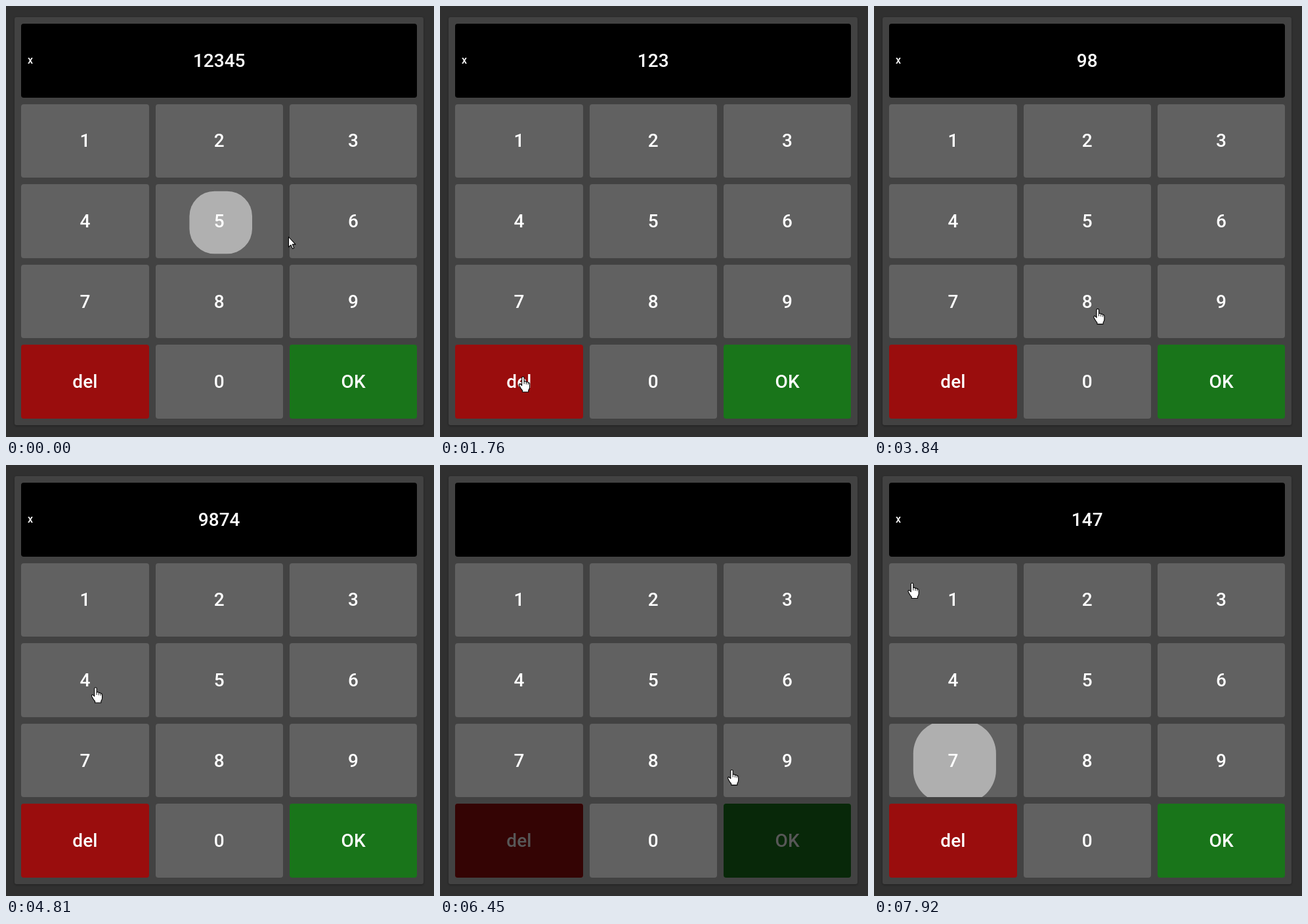
Recreate the animation shown at these times as an HTML page with a canvas. Size 652 by 658 pixels, loop 8000 ms.

```html
<!DOCTYPE html>
<html lang="en">
<head>
<meta charset="utf-8">
<title>Keypad</title>
<style>
html, body { margin: 0; width: 100%; height: 100%; overflow: hidden; background: #303030; }
canvas { display: block; width: 652px; height: 658px; }
</style>
</head>
<body>
<canvas id="stage" width="652" height="658"></canvas>
<script>
const ctx = document.getElementById('stage').getContext('2d');
const LOOP = 8000, STEP = 135, RIPPLE = 700, TRAVEL = 145;
const FONT = 'Roboto, Arial, sans-serif';
const COLORS = { del: '#9a0d0d', OK: '#19751a' };

// The screen refreshes every STEP ms, counted afresh from each of these times
const STARTS = [0, 130, 820, 1370, 2470, 3570, 4660, 5790, 6870, 7920];

const KEYS = ['1', '2', '3', '4', '5', '6', '7', '8', '9', 'del', '0', 'OK'].map((label, i) => {
  const left = 23.2 + (i % 3) * 204.35, top = 27 + (1 + Math.floor(i / 3)) * 122.6;
  const x = Math.round(left), y = Math.round(top);
  return {
    label, x, y,
    w: Math.round(left + 194.35) - x, h: Math.round(top + 112.6) - y,
    cx: left + 97.17, cy: top + 56.3,
    color: COLORS[label] || '#616161'
  };
});

// Runs of presses: first press time, interval, hold time, where on the key the
// pointer rests, and when it sets off and arrives, with a sideways bend
const RUNS = [
  { keys: ['5'], at: -200, hold: 119 },
  { keys: Array(5).fill('del'), at: 1365, gap: 190, hold: 85, spot: [6, -8], go: [820, 1070] },
  { keys: [...'987456'], at: 3450, gap: 390, hold: 190, spot: [16, 11], go: [2340, 3440], bend: [0, -260] },
  { keys: ['OK'], at: 6030, hold: 100, spot: [31, -11], go: [5590, 5590 + TRAVEL] },
  { keys: [...'147'], at: 6860, gap: 390, hold: 135, spot: [31, 12], go: [6130, 6700] }
];

const presses = [];
const moves = [{ go: [0, 540], x: 217, y: 555, bend: [110, 0] }];
for (const { keys, at, gap = 0, hold, spot, go, bend = [0, 0] } of RUNS) {
  keys.forEach((label, i) => {
    const down = at + i * gap;
    presses.push({ label, down, up: down + hold });
    if (!spot) return;
    const key = KEYS.find(k => k.label === label);
    const leave = down - gap + hold;
    moves.push({
      go: i ? [leave, leave + TRAVEL] : go, bend: i ? [0, 0] : bend,
      x: key.cx + spot[0], y: key.cy + spot[1]
    });
  });
}
const lastUp = presses[presses.length - 1].up;
moves.push({ go: [lastUp, lastUp + TRAVEL], x: 58, y: 180, bend: [0, 0] });

// Cubic ease-out with control points (0, 0) and (0.58, 1)
function easeOut(x) {
  let lo = 0, hi = 1;
  for (let i = 0; i < 24; i++) {
    const s = (lo + hi) / 2;
    if (1.74 * (1 - s) * s * s + s ** 3 < x) lo = s; else hi = s;
  }
  return 3 * (1 - lo) * lo * lo + lo ** 3;
}

function box(x, y, w, h, r) {
  ctx.beginPath();
  ctx.roundRect(x, y, w, h, r);
}

function write(text, x, y, size, align) {
  ctx.font = `500 ${size}px ${FONT}`;
  ctx.textAlign = align;
  ctx.fillStyle = '#fff';
  ctx.fillText(text, x, y);
}

function drawRipple(key, age) {
  const p = age / RIPPLE;
  if (p < 0 || p >= 1) return;
  const out = p < 0.2 ? 0 : easeOut((p - 0.2) / 0.8);
  const size = p < 0.2 ? 125 * easeOut(p / 0.2) : 125 + 75 * out;
  ctx.fillStyle = `rgba(255,255,255,${0.5 * (1 - out)})`;
  box(key.cx + 2.5 - size / 2, key.cy + 2 - size / 2, size, size, size * 0.4);
  ctx.fill();
}

function drawKey(key, off, age) {
  ctx.save();
  box(key.x, key.y, key.w, key.h, 4);
  ctx.fillStyle = key.color;
  ctx.fill();
  ctx.clip();
  write(key.label, key.cx, Math.round(key.cy + 9.5), 28, 'center');
  if (off) {
    ctx.fillStyle = 'rgba(0,0,0,0.66)';
    ctx.fillRect(key.x, key.y, key.w, key.h);
  } else {
    drawRipple(key, age);
  }
  ctx.restore();
}

function drawCard() {
  ctx.fillStyle = '#303030';
  ctx.fillRect(0, 0, 652, 658);
  ctx.save();
  ctx.shadowColor = 'rgba(0,0,0,0.35)';
  ctx.shadowBlur = 3;
  ctx.shadowOffsetY = 1;
  ctx.fillStyle = '#424242';
  box(13, 17, 623, 623, 3);
  ctx.fill();
  ctx.restore();
  ctx.fillStyle = '#000';
  box(23, 27, 603, 113, 4);
  ctx.fill();
}

const ARROW = new Path2D('M.5 .5V16L4 12.8L6.4 18.4L8.7 17.4L6.3 11.9H11Z');
const HAND = new Path2D('M-1.7 1.5Q-1.5 .3 0 .3Q1.6 .3 1.8 1.5V7.4Q4.6 6.6 5 8.4Q7.4 7.6 7.9 9.4' +
  'Q10 9 10.2 11V16.5Q10 19 8.4 21V23.5H-.8V21.2Q-3 19 -4.2 16.5L-5.8 13.4Q-6.2 11.4 -4.6 11.2Q-3.4 11.4 -1.7 13.6Z');
const KNUCKLES = new Path2D('M1.8 7.4V11.5M5 8.4V12M7.9 9.4V12.5');

function drawPointer({ x, y }) {
  const over = KEYS.some(k => x >= k.x && x <= k.x + k.w && y >= k.y && y <= k.y + k.h);
  const shape = over ? HAND : ARROW;
  ctx.save();
  ctx.translate(x, y);
  ctx.lineJoin = 'round';
  ctx.lineWidth = 1.1;
  ctx.strokeStyle = '#000';
  ctx.fillStyle = '#fff';
  ctx.fill(shape);
  ctx.stroke(shape);
  if (over) {
    ctx.lineWidth = 0.9;
    ctx.stroke(KNUCKLES);
  }
  ctx.restore();
}

function pointerAt(t) {
  let x = 430, y = 352;
  for (const { go: [start, end], bend, ...to } of moves) {
    if (t <= start) break;
    const u = Math.min(1, (t - start) / (end - start));
    const s = u * u * (3 - 2 * u), arc = Math.sin(Math.PI * u);
    x += (to.x - x) * s + bend[0] * arc;
    y += (to.y - y) * s + bend[1] * arc;
  }
  return { x, y };
}

function typed(text, key) {
  if (key === 'OK') return '';
  return key === 'del' ? text.slice(0, -1) : text + key;
}

function draw(t) {
  const done = presses.filter(p => p.down <= t);
  const text = done.reduce((s, p) => typed(s, p.label), '1234');
  const last = done[done.length - 1];

  drawCard();
  if (text) {
    write('x', 33, 88, 16, 'left');
    write(text, 324.7, 93, 28, 'center');
  }
  for (const key of KEYS) {
    drawKey(key, !text && key.label in COLORS, key.label === last.label ? t - last.up : -1);
  }
  drawPointer(pointerAt(t));
}

function frame() {
  const t = performance.now() % LOOP;
  const start = STARTS.filter(s => s <= t).pop();
  draw(start + STEP * Math.min(7, Math.floor((t - start) / STEP)));
  requestAnimationFrame(frame);
}
frame();
</script>
</body>
</html>
```
